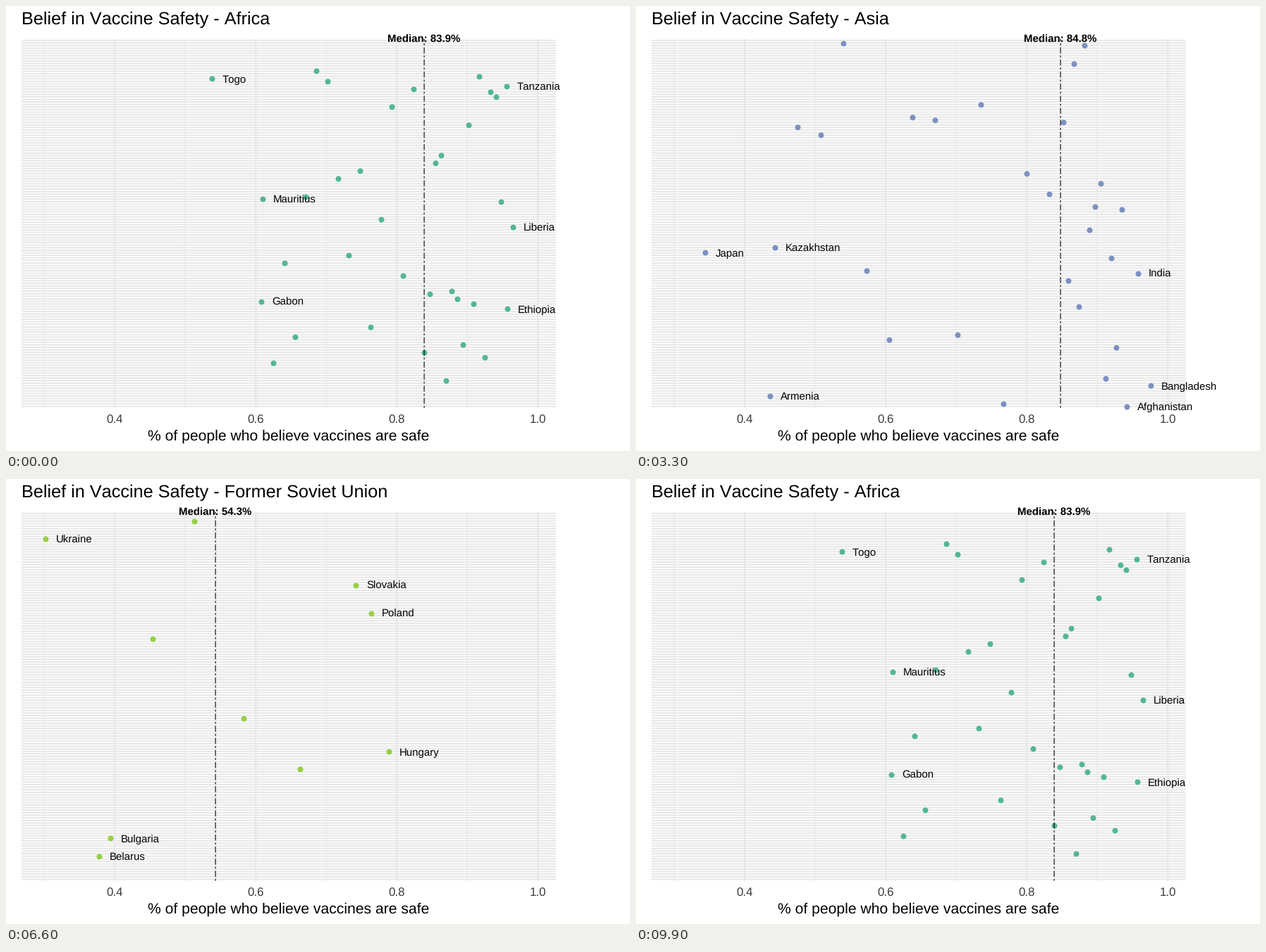
Recreate the animation shown at these times as a matplotlib script. Size 885 by 632 pixels, loop 10000 ms.

```python
import matplotlib.pyplot as plt
import numpy as np
from matplotlib.animation import FuncAnimation

W, H, DPI = 885, 632, 100
PT = 72 / DPI                      # points per pixel
LEFT, RIGHT, TOP, BOTTOM = 22, 780, 46.7, 570.7
ROWS = 144
STEP = (BOTTOM - TOP) / (ROWS + 0.2)
GRID = "#e7e7e7"
FRAMES, MOVE = 100, 8

plt.rcParams["font.family"] = "Liberation Sans"
plt.rcParams["text.hinting"] = "none"
plt.rcParams["text.kerning_factor"] = 6    # effectively no kerning

# name, colour, median share (per mille), unnamed countries,
# then the three lowest and three highest countries: label, row, share
REGIONS = [
    ("Africa", "#53b696", 839, 29, [
        ("Togo", 129, 538), ("Gabon", 42, 608), ("Mauritius", 82, 610),
        ("Tanzania", 126, 956), ("Ethiopia", 39, 957), ("Liberia", 71, 965)]),
    ("Americas", "#fb7c4f", 817, 15, [
        ("Peru", 103, 699), ("Haiti", 49, 701), ("Uruguay", 138, 740),
        ("Dominican Republic", 33, 908), ("Venezuela", 140, 923),
        ("Nicaragua", 94, 935)]),
    ("Asia", "#7c90c1", 848, 24, [
        ("Japan", 61, 344), ("Armenia", 5, 436), ("Kazakhstan", 63, 443),
        ("Afghanistan", 1, 942), ("India", 53, 958), ("Bangladesh", 9, 976)]),
    ("Europe", "#e173b8", 685.5, 26, [
        ("Latvia", 69, 442), ("Montenegro", 86, 446), ("Estonia", 37, 486),
        ("Norway", 98, 821), ("Spain", 120, 825),
        ("Northern Cyprus", 97, 873)]),
    ("Former Soviet Union", "#97d042", 543, 4, [
        ("Ukraine", 134, 302), ("Belarus", 10, 378), ("Bulgaria", 17, 394),
        ("Slovakia", 116, 742), ("Poland", 105, 764), ("Hungary", 51, 789)]),
    ("Middle East and North Africa", "#ffd120", 830, 10, [
        ("Algeria", 3, 650), ("Iran", 55, 680), ("Israel", 58, 756),
        ("Jordan", 62, 908), ("Palestinian Territories", 100, 920),
        ("Egypt", 35, 971)]),
]
CYCLE = FRAMES / len(REGIONS)


def px(share):
    return np.asarray(share) - 245.9


def py(row):
    return BOTTOM - (np.asarray(row) - 0.4) * STEP


def cubic_in_out(u):
    return 4 * u ** 3 if u < 0.5 else 1 - 4 * (1 - u) ** 3


fig = plt.figure(figsize=(W / DPI, H / DPI), dpi=DPI, facecolor="white")
ax = fig.add_axes([0, 0, 1, 1])
ax.set_xlim(0, W)
ax.set_ylim(H, 0)
ax.axis("off")


def text(x, y, s, size, **kw):
    return ax.text(x, y, s, fontsize=size * PT, va="baseline", **kw)


def grid_v(shares, width):
    ax.vlines(px(shares), TOP, BOTTOM, colors=GRID, lw=width * PT, zorder=1,
              snap=False)


ax.hlines(py(np.arange(1, ROWS + 1)), LEFT, RIGHT, colors=GRID, lw=2.05 * PT,
          zorder=1, snap=False)
grid_v(range(300, 1000, 200), 1.03)
grid_v(range(400, 1001, 200), 2.05)
for v in range(400, 1001, 200):
    text(px(v), 593, f"{v / 1000:.1f}", 16.9, ha="center", color="#3b3b3b")
text((LEFT + RIGHT) / 2, 617, "% of people who believe vaccines are safe",
     21.1, ha="center")

title = text(LEFT, 26, "", 25.3)
line, = ax.plot([0, 0], [BOTTOM, TOP], color="black", lw=1.1 * PT,
                dashes=(2.6, 2.6, 7.8, 2.6), dash_capstyle="butt",
                snap=False, zorder=4)
median_text = text(0, TOP + 5.5, "", 15, ha="center", weight="bold", zorder=6)

# Unnamed countries share out the remaining rows at random
named = [row for region in REGIONS for _, row, _ in region[4]]
free = np.setdiff1d(np.arange(1, ROWS + 1), named)
free = list(np.random.default_rng(7).permutation(free))


def make_layer(colour, median, count, extremes):
    """Dots and labels; unnamed shares spread evenly around the median."""
    _, rows, shares = zip(*extremes)
    u = np.arange(1, count + 1) / (count + 1)
    inner = np.interp(u, [0, 0.5, 1], [shares[2], median, shares[3]])
    inner_rows = [free.pop() for _ in inner]
    dots = ax.scatter(px([*shares, *inner]), py([*rows, *inner_rows]),
                      s=(8 * PT) ** 2, c=colour, linewidths=0, zorder=3)
    tags = [text(px(share) + 15, py(row) + 5.6, label, 15, zorder=5)
            for label, row, share in extremes]
    return [dots, *tags]


layers = [make_layer(*region[1:]) for region in REGIONS]
medians = [region[2] for region in REGIONS]


def locate(frame):
    """Region index and progress towards the next region."""
    for i in range(len(REGIONS)):
        start = round(CYCLE * (i + 1)) - MOVE     # first moving frame
        if frame < start:
            return i, 0
        if frame < start + MOVE - 1:
            return i, (frame - start + 1) / MOVE
    return 0, 0


def draw(frame):
    here, u = locate(frame)
    after = (here + 1) % len(REGIONS)
    for i, layer in enumerate(layers):
        for artist in layer:
            artist.set_visible(i == here)
    nearest = after if u > 0.5 else here
    title.set_text(f"Belief in Vaccine Safety - {REGIONS[nearest][0]}")
    m = medians[here] + (medians[after] - medians[here]) * cubic_in_out(u)
    line.set_xdata([px(m)] * 2)
    median_text.set_visible(u == 0)
    median_text.set_x(px(m))
    median_text.set_text(f"Median: {m / 10:.1f}%")
    return []


anim = FuncAnimation(fig, draw, frames=FRAMES, interval=100, repeat=True,
                     repeat_delay=0, init_func=lambda: draw(0))
plt.show()
```
